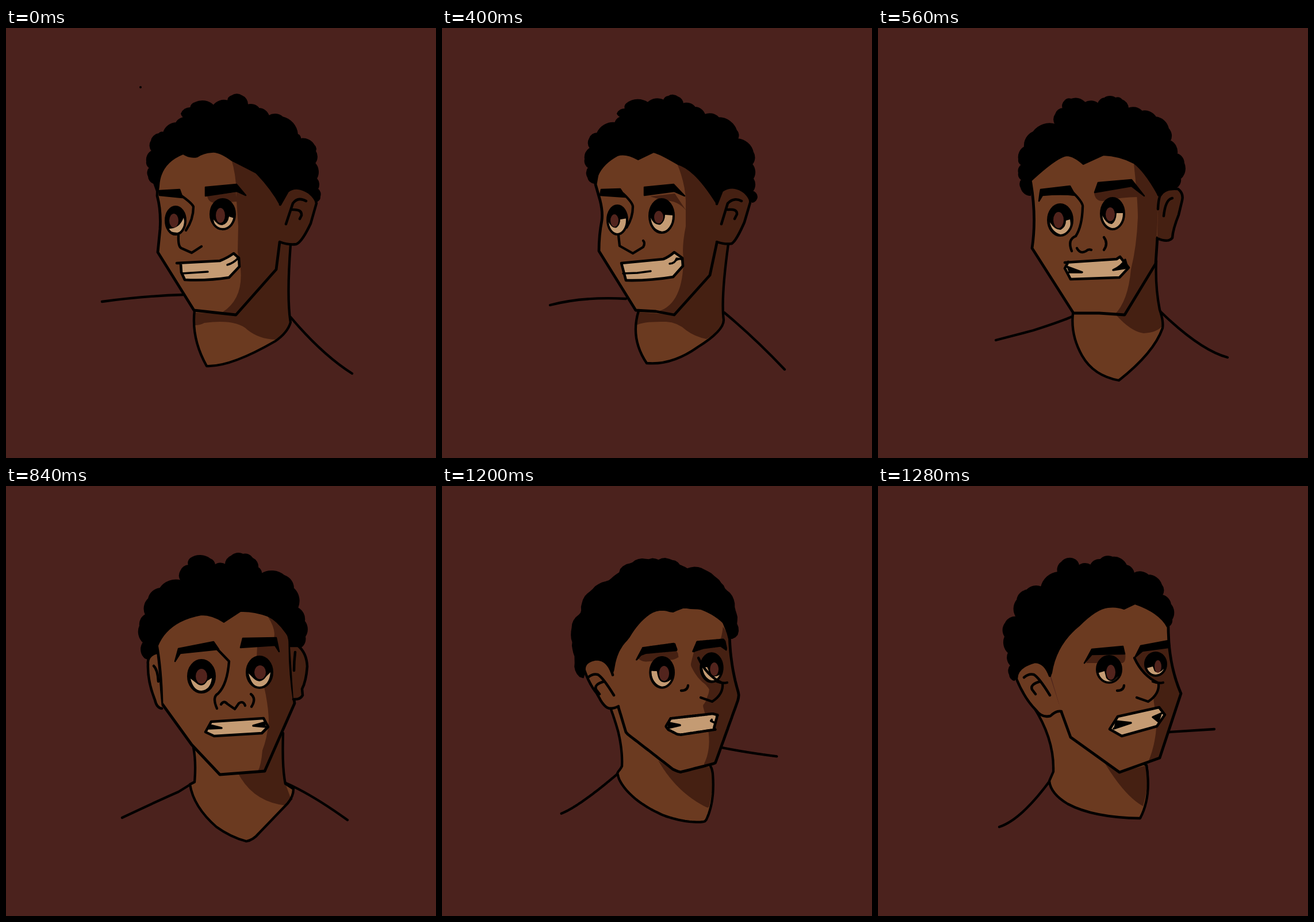
Animation of 748x748 px, one loop 1640 ms. Source, as an HTML page:

```html
<!DOCTYPE html>
<html lang="en">
<head>
<meta charset="utf-8">
<title>Head turn</title>
<style>
html, body { margin: 0; width: 100%; height: 100%; overflow: hidden; background: #4b221d; }
svg { display: block; width: 100vw; height: 100vh; stroke-linecap: round; stroke-linejoin: round; }
</style>
</head>
<body>
<svg id="stage" viewBox="0 0 748 748"></svg>
<script>
const SKIN = '#6b3a20', SHADE = '#452012', PALE = '#c49b73', IRIS = '#52241d', INK = '#000';

// Paint order: part, fill, line width
const LAYERS = [
  ['dot', INK, 0], ['shoulders', 'none', 4.3],
  ['neck', SKIN, 0], ['neckShade', SHADE, 0], ['neck', 'none', 4.3],
  ['face', SKIN, 0], ['faceShade', SHADE, 0], ['browShade', SHADE, 0], ['face', 'none', 4.8],
  ['hair', INK, 2], ['ear', SKIN, 4.5], ['darkEar', SHADE, 4.5], ['earLines', 'none', 4.5],
  ['eyes', INK, 0], ['whites', PALE, 0], ['eyes', 'none', 4], ['irises', IRIS, 0],
  ['brows', INK, 2.5], ['nose', 'none', 4.3], ['mouth', PALE, 4.6], ['teeth', INK, 3.5]
];

const oval = (x, y, rx, ry) =>
  `M${x - rx} ${y}a${rx} ${ry} 0 0 1 ${2 * rx} 0a${rx} ${ry} 0 0 1 ${-2 * rx} 0Z`;

// Curly outline through the given points, closed by a plain hairline
function curls(points, hairline) {
  const p = points.split(' ').map(s => s.split(',').map(Number));
  return p.reduce((d, [x, y], i) => {
    if (!i) return `M${x} ${y}`;
    const r = 0.85 * Math.hypot(x - p[i - 1][0], y - p[i - 1][1]);
    return `${d}A${r} ${r} 0 0 1 ${x} ${y}`;
  }, '') + hairline;
}

const left = {
  dot: oval(234, 103, 2, 2),
  shoulders: 'M167 476Q240 466 308 464M495 503Q550 568 602 601',
  neck: 'M328 491Q322 540 349 588Q390 590 468 545Q490 530 495 512Q488 470 495 377',
  neckShade: 'M329 495L329 517Q338 517 345 513Q400 506 420 525Q440 541 468 542Q490 530 495 512Q488 470 495 377L476 373L470 420L400 499Z',
  face: 'M480 300L400 200L300 200L270 220L264 270L263 292Q270 318 268 350L264 390L327 491L400 499L470 420L476 373',
  faceShade: 'M392 228Q402 262 401 300L404 345L403 390Q422 465 377 494L400 499L470 420L476 373L490 370L478 306L440 252Z',
  browShade: 'M350 292Q352 305 366 304L402 302L400 286Z',
  hair: curls('257,270 248,258 250,243 245,232 254,214 253,196 266,184 274,182 296,165 314,156 305,149 321,139 329,130 361,135 386,127 393,118 410,118 420,134 440,140 457,153 481,155 507,185 512,193 536,204 538,214 537,235 540,262 542,280 546,293 540,302',
    'L525 284Q505 272 490 284L477 308Q462 280 435 252Q412 240 392 230Q370 214 358 216Q343 217 333 224Q320 227 308 219Q268 235 266 275L264 290Z'),
  darkEar: 'M477 307L490 284Q505 272 527 286Q540 297 540 305L530 340Q515 372 505 376Q492 378 476 372',
  earLines: 'M487 341L499 305Q508 293 522 301M498 316Q515 315 514 326L511 332',
  eyes: oval(295, 335, 17, 24) + oval(377, 324, 21, 26),
  whites: 'M309 330Q314 352 298 356Q284 355 280 349Q301 351 309 330ZM397 331Q392 346 374 352Q362 345 361 333Q368 343 376 343Q386 341 388 328Z',
  irises: oval(292, 335, 8, 12) + oval(373, 326, 8, 13),
  brows: 'M267 283L302 281L307 295L267 291ZM347 277L401 272L417 291L402 284L347 292Z',
  nose: 'M304 291Q324 305 326 311Q326 333 313 352M300 361Q299 380 305 383L323 391L340 380',
  mouth: 'M297 409L372 405Q385 400 396 392L405 400L406 415L388 434Q350 440 311 438L305 425L304 411',
  teeth: 'M306 427L351 424M385 412Q396 409 404 400'
};

const leftMid = {
  shoulders: 'M188 482Q245 467 320 471M491 495Q545 540 596 594',
  neck: 'M342 492Q327 540 356 583Q400 587 445 555Q490 527 490 508Q485 470 498 376',
  neckShade: 'M341 494L338 517Q350 510 390 511Q410 512 425 526Q440 537 460 541Q490 525 490 508Q485 470 498 376L478 374L466 430L404 499Z',
  face: 'M480 300L420 220L300 200L275 225L267 272L275 300Q280 320 278 335Q273 360 273 388L337 491L372 493L404 499L466 430L478 374',
  faceShade: 'M409 236Q423 270 424 300L424 345Q417 380 420 400Q420 480 376 493L404 499L466 430L478 374L490 370L478 306Q440 245 409 236Z',
  browShade: 'M362 293L405 288L425 318Q410 299 385 300Z',
  hair: curls('265,270 254,260 255,243 249,228 258,209 257,192 270,183 301,165 315,154 305,149 319,141 322,131 358,130 386,126 394,119 410,120 419,132 440,138 457,151 481,156 512,178 514,193 541,216 539,237 541,262 540,284 548,294 540,303',
    'L525 285Q505 270 487 282L478 306Q440 245 410 237Q380 219 368 216L341 229Q320 217 305 222Q272 240 267 270Z'),
  darkEar: 'M478 306L487 283Q507 270 527 286Q538 297 536 304L526 338Q512 370 504 375Q492 377 478 372',
  earLines: 'M486 341L497 305Q508 294 521 301M497 316Q514 314 513 324L509 332',
  eyes: oval(305, 334, 17, 25) + oval(382, 327, 21, 29),
  whites: 'M322 331Q324 354 304 358Q289 352 289 336Q296 350 304 347Q310 342 310 333ZM403 326Q402 353 383 354Q364 350 363 330Q369 344 380 342Q388 336 388 325Z',
  irises: oval(300, 335, 7, 11) + oval(377, 329, 8, 11),
  brows: 'M277 281L310 280L319 294L275 291ZM352 277L403 272L422 292L404 284L352 291Z',
  nose: 'M315 288Q332 304 332 311Q332 330 321 347M307 361L309 379L332 392L350 381Q354 374 350 370',
  mouth: 'M312 409L385 402Q395 398 404 390L418 400L419 414L402 433Q360 440 320 439Z',
  teeth: 'M315 427L340 426L363 423M396 410Q405 410 408 401L416 402'
};

const centreLeft = {
  shoulders: 'M205 543L270 526Q320 510 340 501M491 493Q560 560 608 573',
  neck: 'M339 497Q335 535 355 570Q375 605 419 613Q480 565 495 522Q497 510 490 490Q482 450 484 405',
  neckShade: 'M415 500Q440 528 462 531Q485 530 495 518L490 490Q482 450 484 405L483 410L429 499Z',
  face: 'M488 290L470 220L300 200L262 250L266 270Q276 330 268 383L340 496L385 496L429 499L483 410L486 365',
  faceShade: 'M445 236Q452 300 452 330Q450 380 440 420Q435 475 412 498L429 499L483 410L488 290Q465 250 445 236Z',
  browShade: 'M376 287Q378 302 392 301Q425 294 452 294L460 290L440 272Z',
  hair: curls('265,291 249,278 250,264 245,252 250,238 245,228 255,207 270,181 309,168 309,150 322,140 325,127 336,124 360,130 383,132 394,122 413,122 424,125 435,140 459,145 483,155 505,175 508,196 520,219 532,235 526,262 518,278',
    'L508 280L488 292Q465 250 445 235Q420 222 392 221L357 237Q340 222 328 222Q310 225 264 268Z'),
  darkEar: 'M487 315Q488 294 492 290Q500 278 522 280Q532 288 529 300L523 325Q513 350 512 365Q505 374 486 366',
  earLines: 'M497 327Q500 298 512 296',
  eyes: oval(317, 334, 21, 27) + oval(408, 323, 20, 27),
  whites: 'M334 333Q338 357 320 360Q302 355 299 338Q308 352 318 351Q327 346 327 335ZM427 322Q429 347 410 349Q392 345 390 326Q398 342 407 341Q414 337 415 322Z',
  irises: oval(314, 334, 9, 14) + oval(404, 324, 8, 12),
  brows: 'M283 281L334 275L343 291Q320 288 286 291L280 301L282 286ZM383 269L441 264L463 292L441 275L377 286Z',
  nose: 'M340 287Q358 305 356 312Q355 345 344 362Q329 368 337 388M346 383Q352 394 362 388Q366 384 371 386M393 364Q401 375 393 386',
  mouth: 'M325 408L415 402L421 398L436 417L420 434L335 437L325 418L331 407',
  teeth: 'M328 415L355 425L332 425M409 421Q424 414 430 403L434 417Z'
};

const centre = {
  shoulders: 'M202 577Q270 545 300 532L329 514M485 516Q530 535 594 581M329 510L329 533M486 518Q489 538 496 544',
  neck: 'M326 455Q331 480 328 515L320 519Q326 558 366 593Q391 611 418 618Q430 616 440 604L490 552Q500 540 500 527L486 518Q480 490 482 430',
  neckShade: 'M404 500Q430 550 488 556L496 545L486 518Q480 490 482 430L450 496Z',
  face: 'M262 275Q270 320 271 378L323 450L372 502L450 496L502 378Q493 320 494 270L480 210L300 200Z',
  faceShade: 'M456 228Q470 250 466 265L437 278L436 300Q457 370 457 410Q454 440 446 460Q444 485 438 497L450 496L502 378Q493 320 494 262Q475 235 456 228Z',
  hair: curls('250,300 239,296 239,272 233,243 243,224 248,196 268,178 305,165 304,148 318,138 321,126 355,127 363,138 382,137 392,122 412,119 429,126 438,142 444,153 484,156 500,178 507,212 519,235 520,262 512,281',
    'L493 278L492 263Q475 235 455 226Q430 217 408 218L379 237Q360 224 340 224Q280 235 263 280L262 292Z'),
  ear: 'M262 290Q245 295 247 310Q246 340 259 372Q262 386 271 387',
  darkEar: 'M494 278L508 278Q523 290 524 314Q522 340 515 353L516 364Q512 372 500 371',
  earLines: 'M257 313Q264 320 265 340M503 289Q501 305 501 321',
  eyes: oval(340, 331, 23, 28) + oval(441, 324, 22, 27),
  whites: 'M321 335Q326 356 340 356Q356 354 358 334L350 339Q342 353 330 342ZM422 326Q428 350 442 350Q458 346 460 324L453 331Q443 346 431 335Z',
  irises: oval(340, 331, 10, 13) + oval(442, 324, 10, 12),
  brows: 'M300 283L361 271L370 284L303 291L294 305ZM412 265L470 264L475 288L468 277L408 281Z',
  nose: 'M363 279L388 305Q385 345 369 361Q358 367 367 387M374 380Q379 372 385 379L398 388L405 378Q413 373 416 382M426 362Q436 370 427 384',
  mouth: 'M357 410L448 404L456 419L445 430L362 435L347 428Z',
  teeth: 'M355 416L375 421L353 422M451 411L430 417L452 419'
};

const right = {
  shoulders: 'M206 558Q230 548 317 488M474 468Q520 482 581 494M317 485L317 508M462 490L462 508',
  neck: 'M302 380L313 426Q319 460 317 488L306 497Q335 545 390 575Q430 592 459 587Q476 555 472 500L468 487L320 400',
  neckShade: 'M367 475Q400 535 465 562Q474 530 471 487L405 500Z',
  face: 'M300 378L313 426L405 500L468 487L513 367Q500 320 498 270L470 200L330 210L298 260L290 316',
  faceShade: 'M480 232Q486 250 486 265L434 282L419 307Q430 340 454 352Q455 375 440 382Q446 400 452 425Q462 465 446 491L468 487L513 367Q500 320 498 250Z',
  browShade: 'M328 294Q335 306 345 304L402 298L398 280Z',
  hair: curls('250,331 237,322 236,296 232,268 231,245 247,220 249,197 269,179 297,163 318,147 322,134 340,130 370,131 388,126 412,125 426,146 436,156 478,156 496,178 500,193 514,225 513,255 511,279',
    'L498 280L496 250Q470 218 422 211L402 224Q385 210 369 214Q345 222 325 262Q300 280 297 320L294 330L285 305Q270 290 255 305Z'),
  ear: 'M296 328Q288 300 270 297Q250 298 251 312Q258 335 270 350Q280 375 283 378Q292 387 301 379',
  earLines: 'M265 313Q276 320 287 339',
  eyes: oval(373, 327, 20, 28) + oval(462, 319, 19, 27),
  whites: 'M354 320Q355 350 374 355Q390 350 390 338Q380 345 371 341Q364 334 364 322ZM446 315Q446 338 462 344Q476 342 478 332Q468 337 460 333Q455 325 455 315Z',
  irises: oval(377, 327, 9, 13) + oval(467, 321, 8, 12),
  brows: 'M338 280L394 271L399 283L336 291L327 301ZM437 267L484 265L491 287L483 276L436 282L430 285Z',
  nose: 'M434 282L419 307Q430 340 454 353Q453 372 445 379Q436 384 427 380Q425 369 415 371M402 366Q394 370 403 379',
  mouth: 'M388 406L472 401L468 403L466 425L472 426L405 432L380 420Z',
  teeth: 'M384 413L402 418L383 421M457 412L467 412'
};

const farRight = {
  shoulders: 'M211 593Q250 580 301 510M507 428L585 423M305 490L306 516M467 486L469 500',
  neck: 'M270 383Q307 440 305 497L298 513Q300 535 330 553Q375 577 456 578Q476 540 467 486L320 380',
  neckShade: 'M395 483Q430 540 461 557Q472 520 467 486L420 498Z',
  face: 'M319 393L335 437L420 498L490 473L527 361Q505 310 505 245L480 190L350 215L310 255L297 318',
  faceShade: 'M506 270L455 283L446 299Q465 335 488 345Q487 362 479 365Q480 385 485 400Q485 445 470 480L490 473L527 361Q512 320 506 270Z',
  browShade: 'M362 308L425 308Q432 306 430 290L370 290Z',
  hair: curls('237,338 229,328 231,312 227,290 221,262 222,238 241,228 242,198 259,181 284,176 313,150 320,132 340,127 349,139 370,138 387,128 408,124 432,138 445,152 470,155 493,172 494,190 509,206 511,232 505,244',
    'L503 245Q490 220 447 205L428 214Q415 209 400 211Q380 213 350 243Q310 275 302 325L299 332L288 312Q270 298 250 315Z'),
  ear: 'M299 330Q290 305 272 306Q240 315 241 336Q255 370 275 390Q285 404 300 400Q310 390 319 392',
  earLines: 'M254 333Q262 326 271 328Q280 333 299 364M282 340Q264 345 268 354L274 362',
  eyes: oval(402, 319, 21, 23) + oval(483, 310, 18, 20),
  whites: 'M384 325Q385 340 400 341Q420 341 421 328L412 337Q404 343 397 334L394 322ZM467 317Q472 327 484 329Q496 325 497 318Q488 328 481 322L478 314Z',
  irises: oval(405, 324, 8, 13) + oval(487, 314, 6, 11),
  brows: 'M372 284L426 279L429 292L372 293L359 308ZM457 278L505 269L505 281L460 287L447 298Z',
  nose: 'M446 299Q460 330 488 343Q490 362 470 375L450 368M416 356Q427 356 428 347M478 340Q488 344 496 342',
  mouth: 'M417 401L489 385L499 398L485 418L424 435L403 423Z',
  teeth: 'M413 409L440 412L410 422M494 395L478 402L489 411'
};

const svgPath = () => document.createElementNS('http://www.w3.org/2000/svg', 'path');
const ruler = svgPath();

function sample(d, count = 150) {
  ruler.setAttribute('d', d);
  const length = ruler.getTotalLength();
  return Array.from({ length: count + 1 }, (_, i) => ruler.getPointAtLength(length * i / count));
}

// Blends two drawings by walking both outlines at the same pace
function blendPath(a = '', b = '', k) {
  const from = a.split(/(?=M)/), to = b.split(/(?=M)/);
  if (!a || from.length !== to.length) return b;
  return from.map((d, i) => {
    const end = sample(to[i]);
    return 'M' + sample(d).map((p, j) =>
      `${(p.x + (end[j].x - p.x) * k).toFixed(1)} ${(p.y + (end[j].y - p.y) * k).toFixed(1)}`).join('L');
  }).join('');
}

const blend = (a, b, k) =>
  Object.fromEntries(Object.keys(b).map(part => [part, blendPath(a[part], b[part], k)]));

const LOOP = 1640;
const timeline = [
  [0, left], [400, leftMid], [440, blend(leftMid, centreLeft, 0.5)], [560, centreLeft],
  [840, centre], [1080, right], [1200, blend(right, farRight, 1 / 3)],
  [1240, blend(right, farRight, 2 / 3)], [1280, farRight]
];

const paths = LAYERS.map(([, fill, width]) => {
  const path = svgPath();
  path.setAttribute('fill', fill);
  if (width) {
    path.setAttribute('stroke', INK);
    path.setAttribute('stroke-width', width);
  }
  return document.getElementById('stage').appendChild(path);
});

const start = performance.now();
let shown;
function draw() {
  const time = Math.max(0, performance.now() - start) % LOOP;
  const pose = timeline.findLast(([at]) => at <= time)[1];
  if (pose !== shown) {
    LAYERS.forEach(([part], i) => paths[i].setAttribute('d', pose[part] || ''));
    shown = pose;
  }
  requestAnimationFrame(draw);
}
draw();
</script>
</body>
</html>
```
